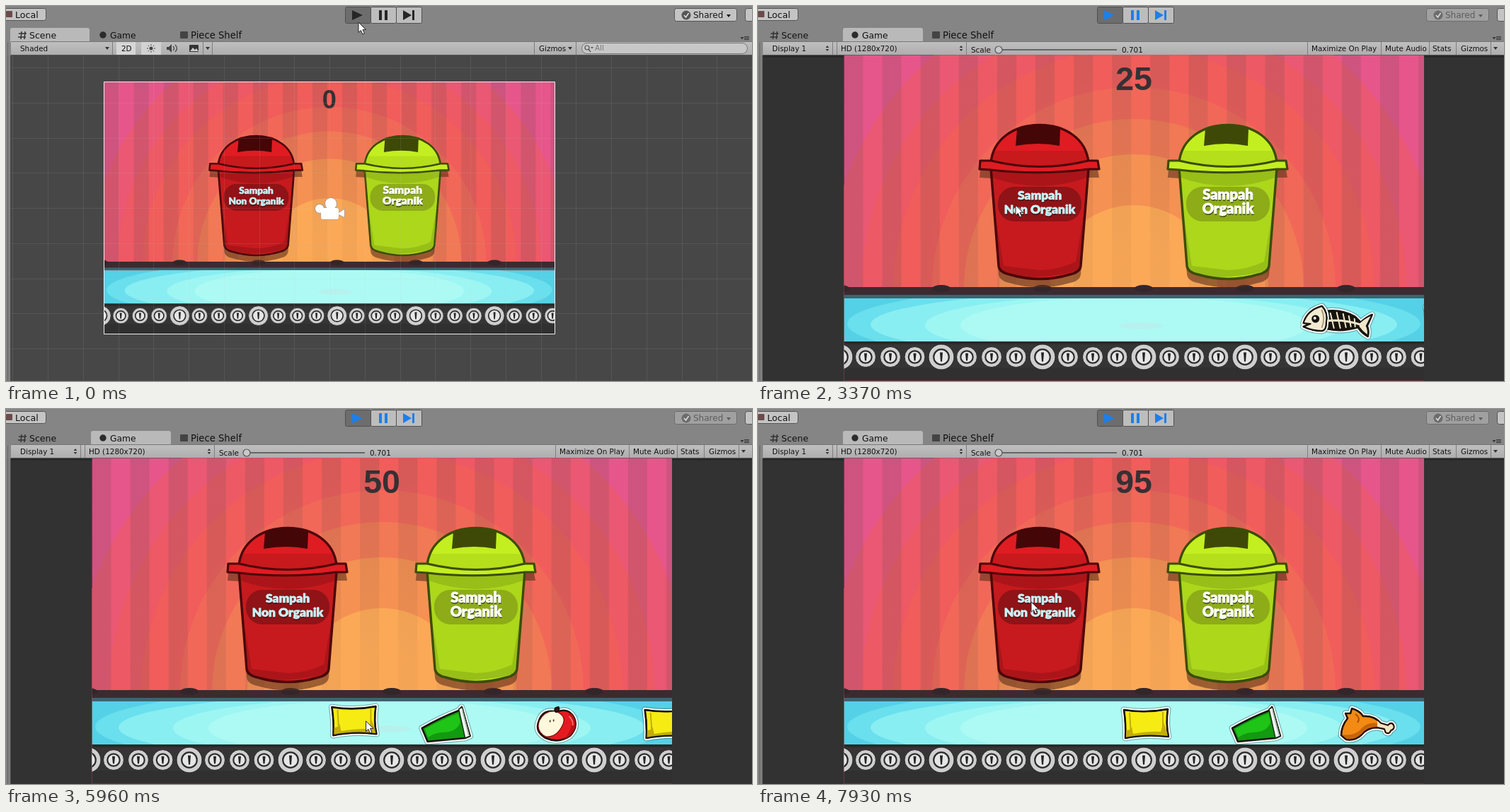
An HTML page with a canvas that plays this animation: 1054 px wide and 531 px high, repeating every 8000 ms.

```html
<!DOCTYPE html>
<html lang="id">
<head>
<meta charset="utf-8">
<title>Sorting game</title>
<style>
html, body { margin: 0; width: 100%; height: 100%; overflow: hidden; background: #323232; }
canvas { display: block; width: 1054px; height: 531px; }
</style>
</head>
<body>
<canvas id="stage" width="1054" height="531"></canvas>
<script>
const ctx = document.getElementById('stage').getContext('2d');
const LOOP = 8000, PLAY_AT = 720;
const UI = '"DejaVu Sans", sans-serif';
const LEFT = 121.5, TOP = 69.5, WIDE = 819.5, HIGH = 461.5;

// Screen refreshes come in bursts: [first, last, count]
const bursts = [[0, 0, 1], [720, 980, 3], [1260, 2270, 8], [2400, 3370, 8], [3490, 4440, 8],
  [4590, 5550, 8], [5690, 6650, 8], [6800, 7780, 8], [7930, 7930, 1]];

function snap(t) {
  const [a, b, n] = bursts.filter(s => s[0] <= t).pop();
  if (n < 2) return a;
  const step = (b - a) / (n - 1);
  return a + Math.min(n - 1, Math.floor((t - a) / step + 0.06)) * step;
}

// Pointer path: [time, x, y]
const track = [[0, 498, 23], [1120, 498, 23], [1260, 513, 40], [1550, 590, 170], [1840, 700, 330], [2130, 770, 425],
  [2270, 778, 432], [2400, 778, 432], [2660, 788, 452], [2800, 755, 480], [2950, 600, 420],
  [3100, 440, 320], [3230, 366, 284], [3370, 364, 282], [3490, 390, 300], [3760, 640, 430],
  [3900, 716, 446], [4030, 712, 410], [4170, 672, 320], [4300, 651, 280], [4440, 650, 277],
  [4590, 649, 270], [4860, 600, 350], [5140, 530, 435], [5420, 511, 446], [5690, 510, 446],
  [5820, 510, 446], [5960, 509, 443], [6100, 495, 410], [6240, 466, 350], [6380, 452, 325], [6510, 470, 400],
  [6650, 490, 446], [6800, 470, 425], [6940, 434, 374], [7080, 429, 368], [7220, 460, 415],
  [7360, 502, 446], [7500, 480, 410], [7640, 420, 310], [7780, 392, 276], [7930, 386, 273]];

function pointer(t) {
  const i = track.findIndex(p => p[0] > t);
  if (i < 0) return track[track.length - 1].slice(1);
  const [t0, x0, y0] = track[i - 1], [t1, x1, y1] = track[i];
  const k = (t - t0) / (t1 - t0);
  return [x0 + (x1 - x0) * k, y0 + (y1 - y0) * k];
}

const scores = [[0, '0'], [3225, '25'], [4300, '50'], [6375, '75'], [7075, '100'], [7920, '95']];

// Items ride the belt; grab and drop are the drag times
const items = [
  { draw: pack, grab: 2670, drop: 3225 },
  { draw: fish, grab: 3895, drop: 4300 },
  { draw: pack, grab: 5826, drop: 6375 },
  { draw: cup, grab: 6645, drop: 7075 },
  { draw: apple, grab: 7355, drop: 7920 },
  { draw: pack }, { draw: cup }, { draw: drumstick }];

function place(item, i, t) {
  const ride = u => 853 + 156 * i - 0.1962 * (u - 2400);
  if (!(t > item.grab)) return [ride(t), 446];
  const from = pointer(item.grab), now = pointer(t);
  return [ride(item.grab) + now[0] - from[0], 446 + now[1] - from[1]];
}

function box(x, y, w, h, fill, r = 0, line) {
  ctx.beginPath();
  ctx.roundRect(x, y, w, h, r);
  if (fill) { ctx.fillStyle = fill; ctx.fill(); }
  if (line) { ctx.strokeStyle = line; ctx.lineWidth = 1; ctx.stroke(); }
}
function oval(x, y, rx, ry, fill, line, lw = 1) {
  ctx.beginPath();
  ctx.ellipse(x, y, rx, ry, 0, 0, 7);
  if (fill) { ctx.fillStyle = fill; ctx.fill(); }
  if (line) { ctx.strokeStyle = line; ctx.lineWidth = lw; ctx.stroke(); }
}
function shape(d, fill, line, lw = 1) {
  const p = new Path2D(d);
  if (fill) { ctx.fillStyle = fill; ctx.fill(p); }
  if (line) { ctx.strokeStyle = line; ctx.lineWidth = lw; ctx.stroke(p); }
}
function text(s, x, y, font, fill = '#111', align = 'left') {
  ctx.font = font;
  ctx.fillStyle = fill;
  ctx.textAlign = align;
  ctx.fillText(s, x, y);
}
function at(x, y, draw) {
  ctx.save();
  ctx.translate(x, y);
  draw();
  ctx.restore();
}
function inside(d, draw) {
  ctx.save();
  ctx.clip(new Path2D(d));
  draw();
  ctx.restore();
}

function sticker(d, fill) {
  ctx.lineJoin = 'round';
  shape(d, null, 'rgba(25,55,60,.35)', 9);
  shape(d, null, '#fff', 6.5);
  shape(d, fill, '#151510', 2.6);
}
function pack() {
  const d = 'M-31-20Q0-15 31-21Q28 0 32 18Q0 14-29 20Q-28 0-31-20Z';
  sticker(d, '#f6ec13');
  inside(d, () => {
    shape('M-31 8Q-23 11-20 4L-18 14Q5 10 21 11L25-2L33 20L-31 22Z', '#c4ad0a');
    shape('M-23-16L-21 15M24-17L24 13', null, '#c4ad0a', 2);
  });
  shape(d, null, '#151510', 1.8);
}
function cup() {
  const d = 'M-34 6Q-8-9 18-19L22-24L34 17L27 20L-26 25Z';
  sticker(d, '#129a10');
  shape('M-30 7Q-6-6 17-15L20-3Q16 12-6 12Q-18 13-25 19Z', '#1fc516');
  shape('M18-21L23-24L34 17L27 20Z', '#f4f7f4', '#173018', 1.5);
  shape('M23-19L32 16', null, '#a9b7b0', 1.5);
}
function apple() {
  const d = 'M1-17Q17-24 25-9Q31 5 19 17Q3 28-15 20Q-31 11-25-4Q-19-22 1-17Z';
  sticker(d, '#e51a20');
  inside(d, () => {
    shape('M17-14Q27-1 14 18L5 25L30 22L28-17Z', '#bd1015');
    shape('M-1-18Q16-11 8 3Q0 19-15 18Q-30 10-24-5Q-16-20-1-18Z', '#fff8dc', '#7d1110', 1.3);
  });
  shape('M-1-17Q-5-23 3-24Q5-20 1-17Z', '#3b1510', '#1b0806', 2);
  oval(-9, -4, 1, 1.8, '#57412a');
  oval(-4, -5, 1, 1.8, '#57412a');
  shape('M18-11Q24-5 23 2', null, '#ff6d6a', 2);
}
function fish() {
  const bones = 'M-17-14Q6-17 25-6L33 2Q40-5 49-9Q45 1 42 7Q45 14 43 22Q34 17 29 9Q6 16-16 11Z';
  const head = 'M-48 3Q-43-15-22-21Q-13-12-16 3Q-16 13-22 14Q-35 14-48 8L-38 4Z';
  sticker(bones, '#17130d');
  sticker(head, '#f3ebd1');
  ctx.lineCap = 'round';
  shape('M-17 0Q8-3 32 5', null, '#efe6ca', 3);
  shape('M-10-11L-5 10M-1-12L4 10M8-10L12 9M16-7L19 8M24-3L25 8', null, '#efe6ca', 2);
  shape('M31 4Q38-3 47-7Q43 1 40 7Q43 13 42 19Q36 15 31 8Z', '#efe6ca');
  shape(head, '#f3ebd1', '#17130d', 2);
  oval(-31, -3, 5.5, 5.5, '#17130d');
  oval(-32, -4, 2, 2, '#fff');
  shape('M-22-15Q-17-4-22 9', null, '#a79a76', 2);
}
function drumstick() {
  const d = 'M-36 16Q-36 3-27-8L-30-15L-23-15L-21-22Q-10-19-5-11Q11-12 20-1L30 2Q35-4 38 2Q40 7 34 9Q32 15 27 12L25 7L15 5Q1 5-7 15Q-16 24-29 22Z';
  sticker(d, '#f28a14');
  inside(d, () => {
    shape('M-36 15Q-16 18-6 5Q3-3 15-1L14 8L-5 24L-38 24Z', '#c76408');
    shape('M15-6L43-6L43 17L15 12Z', '#f1e4c1');
  });
  shape(d, null, '#23140a', 1.8);
  shape('M-16-14Q-8-8-13-2', null, '#a34b06', 2);
}

function curtain() {
  const rings = [[435, '#ea5873'], [385, '#ed5964'], [340, '#f05d5a'],
    [285, '#f16858'], [240, '#f17955'], [190, '#f49153'], [118, '#fca957']];
  box(LEFT, TOP, WIDE, 330, '#e7568a');
  for (const [r, c] of rings) oval(531, 400, r, r, c);
  const shade = ctx.createRadialGradient(531, 400, 60, 531, 400, 330);
  shade.addColorStop(0, 'rgba(120,80,50,.06)');
  shade.addColorStop(1, 'rgba(100,75,80,.19)');
  for (let k = 0; k < 31; k += 2) box(LEFT + k * 27.05, TOP, 27.05, 330, shade);
}

function belt() {
  box(LEFT, 398, WIDE, 12, '#3d2a30');
  for (let x = 116; x < 950; x += 143) oval(x, 400, 13, 5, '#33262b');
  box(LEFT, 409, WIDE, 5, '#3c6470');
  inside(`M${LEFT} 414h${WIDE}v62h-${WIDE}z`, () => {
    box(LEFT, 414, WIDE, 62, '#54d1e6');
    oval(531, 450, 405, 56, '#6adfed');
    oval(531, 451, 372, 47, '#88eef2');
    oval(531, 452, 295, 43, '#9ef6f3');
    oval(531, 452, 245, 40, '#adfaf4');
    oval(541, 453, 31, 5, '#b6f1ee');
  });
  box(LEFT, 475, WIDE, 56, '#353535');
  box(LEFT, 475, WIDE, 4, '#292a2b');
  box(LEFT, 512, WIDE, 19, '#303030');
  for (let x = 116; x < 950; x += 143) {
    [0, 36, 71, 105.5].forEach((dx, i) => roller(x + dx, i ? 14.5 : 18));
  }
  box(LEFT, 530, WIDE, 1, '#593a34');
}
function roller(x, r) {
  oval(x, 497, r, r, '#cfcfcf', '#232323', 1);
  oval(x, 497, r * 0.6, r * 0.6, '#e6e6e6', '#2d2d2d', 2.2);
  const h = r * 0.36;
  shape(`M${x - 2} ${497 - h}h4l-1 ${2 * h}h-2z`, '#222');
}

const red = { lid: '#df1c22', low: '#c8191d', body: '#c71a1e', dark: '#ab1519', line: '#4b0609',
  slot: '#450608', tag: '#8f1317', ink: '#c9f3f5', lines: ['Sampah', 'Non Organik'], size: 17.4 };
const green = { lid: '#c3ef20', low: '#b5df1b', body: '#acd71b', dark: '#97bf18', line: '#3d4c08',
  slot: '#3e4908', tag: '#8dac17', ink: '#ffffff', lines: ['Sampah', 'Organik'], size: 20 };

function bin(x, c) {
  const body = 'M-69 230L-58 368Q-57 377-43 380Q0 393 43 380Q57 377 58 368L69 230Z';
  const dome = 'M-69 222C-66 188-36 168.5 0 168.5C36 168.5 66 188 69 222Q0 242-69 222Z';
  const rim = 'M-84 219L-69 219Q0 236 69 219L82 219L84 231L69 231Q0 240-69 232L-85 231Z';
  at(x, 0, () => {
    ctx.lineJoin = 'round';
    at(0, 12, () => {
      shape(body, 'rgba(95,48,25,.6)');
      shape(rim, 'rgba(95,48,25,.6)');
    });
    shape(body, c.body);
    inside(body, () => {
      shape('M-70 230H70V242Q0 268-70 242Z', c.dark);
      shape('M-70 250L-51 368Q-30 383 0 384L0 395L-70 395Z', c.dark);
      shape('M70 250L51 362Q25 374 0 374L-51 368L-51 395L70 395Z', c.dark);
      shape('M-50 382Q0 390 50 377', null, c.lid, 2);
    });
    shape(body, null, c.line, 3.4);
    shape(dome, c.lid);
    inside(dome, () => box(-75, 205, 150, 30, c.low));
    shape(dome, null, c.line, 3.4);
    shape('M-32 174Q0 160 29 174L28 198Q-2 192-34 198Z', c.slot);
    shape(rim, c.lid, c.line, 3.2);
    box(-59, 256, 118, 49, c.tag, 23);
    const font = `900 ${c.size}px Lato, "Open Sans", sans-serif`;
    c.lines.forEach((s, i) => {
      const y = 274 + 20 * i;
      text(s, 0.5, y + 2, font, c.line, 'center');
      ctx.strokeStyle = c.ink;
      ctx.lineWidth = 0.8;
      ctx.strokeText(s, 0, y);
      text(s, 0, y, font, c.ink, 'center');
    });
  });
}

function world(t) {
  inside(`M${LEFT} ${TOP}h${WIDE}v${HIGH}h-${WIDE}z`, () => {
    curtain();
    belt();
    bin(398, red);
    bin(664, green);
    const score = scores.filter(s => s[0] <= t).pop()[1];
    text(score, 531, 118.5, 'bold 46.5px "Liberation Sans", Arial, sans-serif', '#373033', 'center');
    if (t < PLAY_AT) return;
    items.forEach((item, i) => {
      if (t >= item.drop) return;
      const [x, y] = place(item, i, t);
      if (x < 1010) at(x, y, item.draw);
    });
  });
}

function sceneView() {
  box(7, 70, 1047, 461, '#474747');
  ctx.save();
  ctx.translate(138.5, 107.5);
  ctx.scale(0.7775, 0.7745);
  ctx.translate(-LEFT, -TOP);
  world(0);
  ctx.restore();
  for (let i = -9; i < 13; i++) box(Math.round(457 + i * 49.75), 70, 1, 461, 'rgba(190,190,190,.12)');
  for (let i = -4; i < 5; i++) box(7, Math.round(286 + i * 49.75), 1047, 1, 'rgba(190,190,190,.12)');
  box(138.5, 107.5, 637, 357, null, 0, '#eee');
  const camera = (fill, line) => {
    oval(459, 280, 8, 8, fill, line, 2);
    oval(443, 287, 6, 6, fill, line, 2);
    box(445, 286, 25, 16, fill, 3, line);
    shape('M470 293L478 288V299L470 295Z', fill, line, 1.5);
  };
  camera(null, '#a79b91');
  camera('#fff');
}

function tri(x, y, r, up, c = '#333') {
  const h = up ? -r : r;
  shape(`M${x - r} ${y}h${2 * r}l${-r} ${h * 1.3}z`, c);
}
function updown(x) { tri(x, 59, 2.3, true); tri(x, 61, 2.3, false); }
function label(s, x) { text(s, x, 64, '10.4px ' + UI); }
function rule(x) { box(x, 51, 1, 18, '#7d7d7d'); }

function sceneStrip() {
  label('Shaded', 20);
  tri(143, 58, 3);
  rule(150);
  box(156, 51, 27, 18, '#d6d6d6');
  label('2D', 163);
  box(191, 51, 28, 18, '#d2d2d2');
  oval(205, 60, 2.5, 2.5, '#444');
  for (let i = 0; i < 8; i++) {
    const c = Math.cos(i * Math.PI / 4), s = Math.sin(i * Math.PI / 4);
    shape(`M${205 + 4 * c} ${60 + 4 * s}L${205 + 6 * c} ${60 + 6 * s}`, null, '#444', 1);
  }
  shape('M227 58h3l4-4v12l-4-4h-3z', '#444');
  shape('M236 57q3 3 0 6M239 55q5 5 0 10', null, '#444', 1.2);
  box(259, 55, 13, 10, '#333', 1);
  shape('M260 64l4-5 3 3 2-2 3 4z', '#ccc');
  rule(278);
  tri(285, 58, 3);
  rule(291);
  rule(746);
  label('Gizmos', 753);
  tri(797, 58, 3);
  rule(805);
  box(813.5, 52.5, 234, 15, '#c8c8c8', 7.5, '#777');
  oval(821, 59, 3, 3, null, '#555', 1.2);
  shape('M823 61l3 4', null, '#555', 1.3);
  tri(828, 58, 2, false, '#555');
  text('All', 832, 63, '10.4px ' + UI, '#777');
}
function gameStrip() {
  label('Display 1', 20);
  updown(98);
  rule(105);
  rule(111);
  label('HD (1280x720)', 117);
  updown(287);
  rule(294);
  text('Scale', 301, 66, '10.4px ' + UI);
  box(340, 61, 167, 2, '#666');
  oval(340, 62, 5, 5, '#c9c9c9', '#555', 1.2);
  text('0.701', 514, 66, '10.4px ' + UI);
  for (const x of [776, 880, 948, 986, 1035]) rule(x);
  label('Maximize On Play', 782);
  label('Mute Audio', 886);
  label('Stats', 953);
  label('Gizmos', 993);
  tri(1042, 58, 3);
}

function editor(playing) {
  box(0, 0, 1054, 70, '#858585');
  box(0, 70, 7, 461, '#808080');
  box(2, 52, 1, 479, '#686868');
  box(6, 70, 1, 461, '#4c4c4c');

  box(-8.5, 3.5, 65, 17, '#c4c4c4', 3, '#555');
  box(0, 7, 9, 9, '#6e4b4b', 1);
  text('Local', 13, 17, '12.6px ' + UI);

  for (let i = 0; i < 3; i++) box(479.5 + i * 36, 1.5, 36, 23, i ? '#bdbdbd' : '#6d6d6d', 2, '#505050');
  const ink = playing ? '#1c7fea' : '#262626';
  shape('M489 6L504 13L489 20Z', ink);
  box(527, 6, 4, 14, ink);
  box(535, 6, 4, 14, ink);
  shape('M561 6L573 13L561 20ZM574 6h3v14h-3z', ink);

  const faint = playing ? '#5c5c5c' : '#151515';
  box(944.5, 3.5, 88, 18, playing ? '#a0a0a0' : '#c4c4c4', 3, playing ? '#6c6c6c' : '#555');
  oval(961, 13, 6.5, 6.5, playing ? '#6c6c6c' : '#555');
  shape('M958 13l2.5 3 4-6', null, '#ddd', 1.6);
  text('Shared', 971, 17, '12px ' + UI, faint);
  tri(1021, 12, 3, false, faint);
  box(1044.5, 3.5, 20, 18, '#c4c4c4', 3, '#555');

  box(playing ? 120 : 6, 31, playing ? 113 : 112, 20, '#b9b9b9', [3, 3, 0, 0]);
  shape('M22 36l-1 11M27 36l-1 11M18 39h11M17 44h11', null, '#333', 1.5);
  text('Scene', 33, 46, '12.5px ' + UI);
  oval(137, 41, 4.7, 4.7, '#2b2b2b');
  text('Game', 147, 46, '12.3px ' + UI);
  box(246, 36, 11, 10, '#444', 1);
  text('Piece Shelf', 261, 46, '13.2px ' + UI);
  tri(1040, 44, 2.5);
  for (let y = 43; y < 49; y += 2) box(1043, y, 7, 1, '#333');

  const strip = ctx.createLinearGradient(0, 50, 0, 70);
  strip.addColorStop(0, '#c0c0c0');
  strip.addColorStop(1, '#adadad');
  box(7, 50, 1047, 20, strip);
  box(7, 50, 1047, 1, '#777');
  box(7, 69, 1047, 1, '#555');
  playing ? gameStrip() : sceneStrip();
}

function arrow(x, y) {
  at(x, y, () => shape('M0 0V14.5L3.4 11.4L5.8 17L8.4 15.8L6 10.4H10.5Z', '#fff', '#222', 1));
}

function frame(now) {
  const t = snap(now % LOOP);
  const playing = t >= PLAY_AT;
  ctx.lineCap = 'butt';
  editor(playing);
  if (playing) {
    box(7, 70, 1047, 461, '#323232');
    box(7, 70, 1047, 3, '#292929');
    world(t);
  } else sceneView();
  arrow(...pointer(t));
}

let start;
function tick(now) {
  start ??= now;
  frame(now - start);
  requestAnimationFrame(tick);
}
frame(0);
requestAnimationFrame(tick);
</script>
</body>
</html>
```
